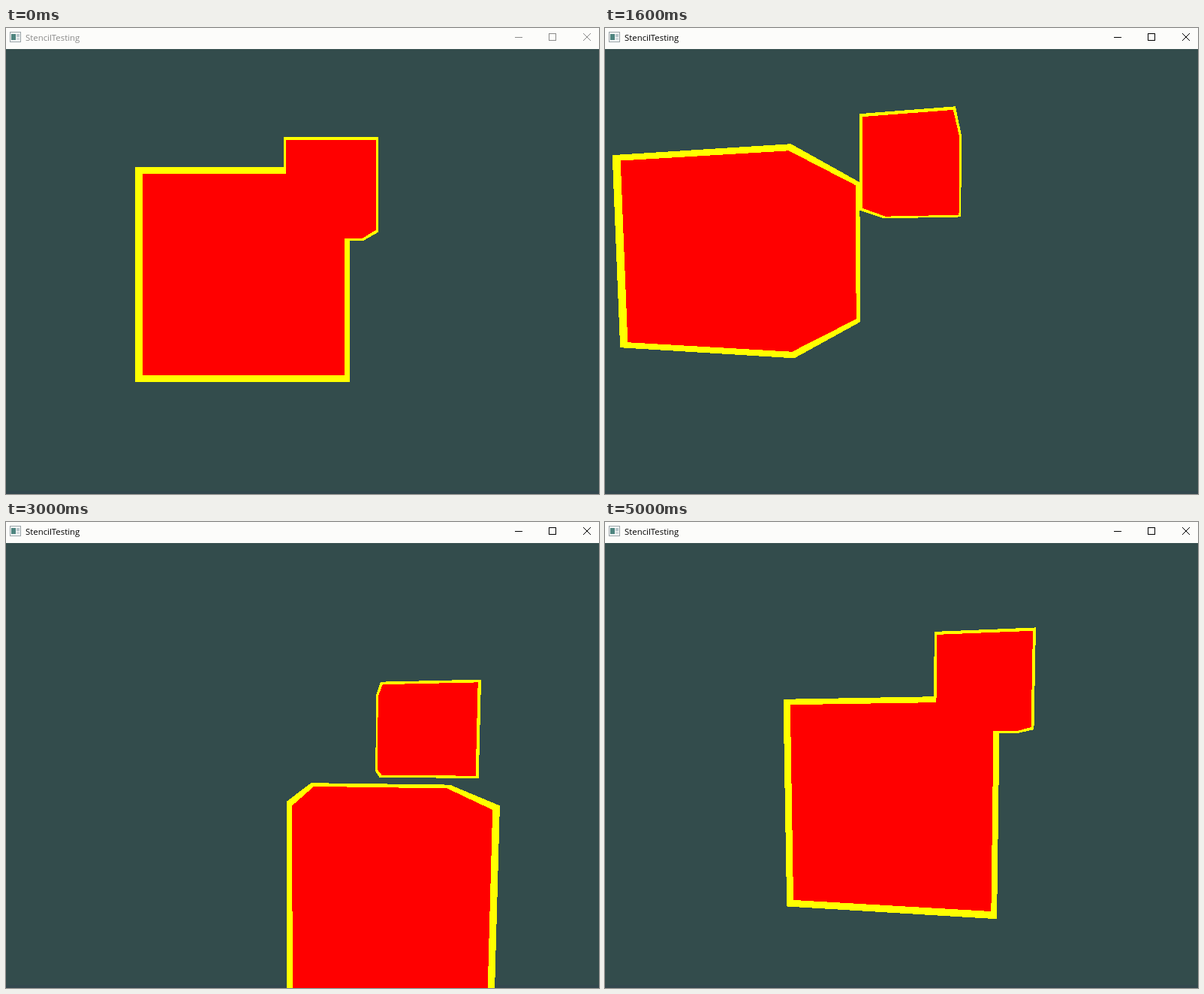
Animation, 790 px wide and 620 px high, one loop 5.5 s. Source, as an HTML page:

```html
<!DOCTYPE html>
<html lang="en">
<head>
<meta charset="utf-8">
<title>StencilTesting</title>
<style>
  html, body { margin: 0; width: 100%; height: 100%; overflow: hidden; }
  svg { display: block; width: 790px; height: 620px; background: #334c4c; }
  text { font: 11.4px "Open Sans", sans-serif; }
  .idle { opacity: .45; }
</style>
</head>
<body>
<svg viewBox="0 0 790 620" shape-rendering="crispEdges">
  <rect y="616" width="790" height="4" fill="#33484e"/>
  <path id="outline" fill="#ff0"/>
  <path id="solid" fill="#f00"/>
  <rect width="790" height="28" fill="#fcfcfa"/>
  <rect x="5.5" y="5.5" width="14" height="13" fill="#f4f6f6" stroke="#9aa4a8"/>
  <rect x="7" y="8" width="6" height="8" fill="#4f8580"/>
  <rect x="14" y="8" width="4" height="4" fill="#b9c6cc"/>
  <rect x="14" y="13" width="4" height="3" fill="#d3dade"/>
  <g id="caption">
    <text x="26" y="17">StencilTesting</text>
    <path d="M678 12.5h10M723.5 7.5h9v9h-9z" fill="none" stroke="#000"/>
    <path d="M769 7l10 10m0-10l-10 10" stroke="#000" shape-rendering="auto"/>
  </g>
</svg>
<script>
const LOOP = 5500, STEP = 100, RAD = Math.PI / 180;
const FOCAL = 300 / Math.tan(30 * RAD), CENTER_X = 397, CENTER_Y = 328;
const HEADING = -8 * RAD;
const CUBES = [[-0.3, 0, -2.432], [0.3, 0.995, -4.845]];

// Key presses and mouse turns: steady change by an amount between two times
const press = (from, to, amount) => t =>
  amount * Math.min(1, Math.max(0, (t - from) / (to - from)));
const track = (...presses) => t => presses.reduce((sum, p) => sum + p(t), 0);

const strafe = track(
  press(360, 700, 1.21), press(700, 1300, .69), press(1300, 1900, -1.474),
  press(2300, 2600, -.3), press(2600, 3000, -.587),
  press(3300, 3650, .96), press(3800, 4100, -.456));
const lift = track(press(2000, 2300, .81), press(3000, 3200, -.52));
const ahead = track(press(200, 700, -.02), press(4200, 4400, -.25), press(4800, 5000, .32));
const yaw = track(press(200, 680, -12), press(1600, 1900, 4));
const pitch = track(press(200, 650, -3.2));

function eyeAt(t) {
  const c = Math.cos(HEADING), s = Math.sin(HEADING);
  const a = strafe(t), h = ahead(t);
  return [a * c + h * s, lift(t), a * s - h * c];
}

function projector(eye, yaw, pitch) {
  const cy = Math.cos(yaw), sy = Math.sin(yaw);
  const cp = Math.cos(pitch), sp = Math.sin(pitch);
  return point => {
    const [dx, dy, dz] = point.map((v, i) => v - eye[i]);
    const level = dx * sy - dz * cy;
    const scale = FOCAL / (level * cp + dy * sp);
    const right = dx * cy + dz * sy, up = dy * cp - level * sp;
    return [CENTER_X + right * scale, CENTER_Y - up * scale].map(v => v.toFixed(2));
  };
}

// Path of the cube faces turned towards the eye, all wound the same way
function cubePath(center, size, eye, project) {
  const half = size / 2;
  let d = "";
  for (let axis = 0; axis < 3; axis++) {
    for (const side of [-1, 1]) {
      if (side * (eye[axis] - center[axis]) <= half) continue;
      const corners = [[-1, -1], [1, -1], [1, 1], [-1, 1]].map(([u, v]) => {
        const p = [...center];
        p[axis] += side * half;
        p[(axis + 1) % 3] += side * u * half;
        p[(axis + 2) % 3] += v * half;
        return project(p);
      });
      d += "M" + corners.join("L") + "Z";
    }
  }
  return d;
}

const byId = id => document.getElementById(id);
const outline = byId("outline"), solid = byId("solid"), caption = byId("caption");

function draw() {
  const t = Math.floor((performance.now() % LOOP) / STEP) * STEP;
  const eye = eyeAt(t);
  const project = projector(eye, yaw(t) * RAD, pitch(t) * RAD);
  const paths = size => CUBES.map(c => cubePath(c, size, eye, project)).join("");
  outline.setAttribute("d", paths(1.05));
  solid.setAttribute("d", paths(1));
  caption.setAttribute("class", t < 200 ? "idle" : "");
  requestAnimationFrame(draw);
}
draw();
</script>
</body>
</html>
```
